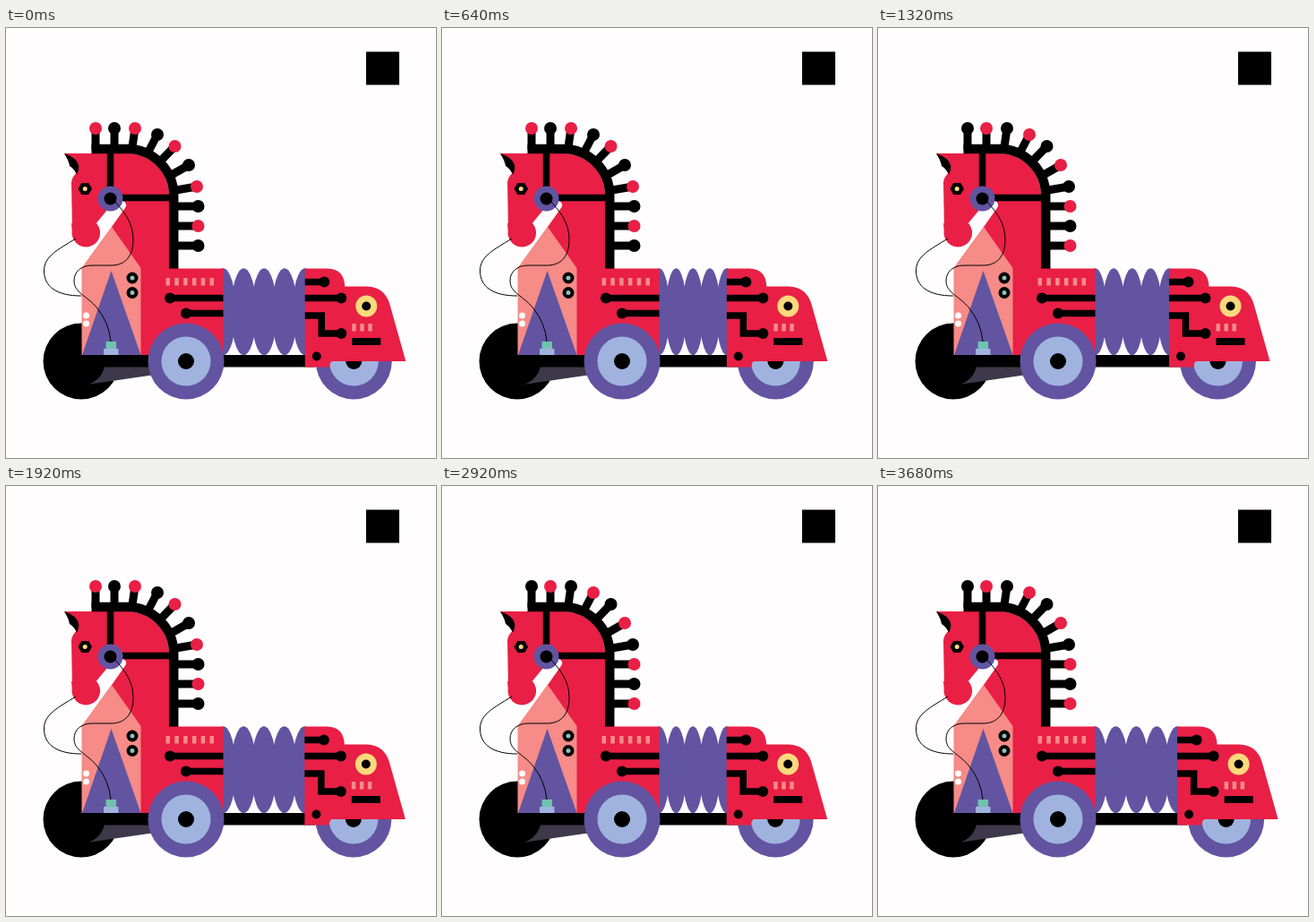
An HTML page that plays this animation: 480x480 px, repeating every 3.76 s.

```html
<!DOCTYPE html>
<html lang="en">
<head>
<meta charset="utf-8">
<title>Trojan horse car</title>
<style>
  html, body { margin: 0; width: 100%; height: 100%; overflow: hidden; background: #fffdfd; }
  svg { display: block; width: 100vw; height: 100vh; }
  .red { fill: #e91f45; }
  .purple { fill: #6254a1; }
  .blue { fill: #9fb3de; }
  .pink { fill: #f68b87; }
  .yellow { fill: #fed97c; }
  .white { fill: #fffdfd; }
  .line { fill: none; stroke: #000; stroke-width: 7.5; }
  .wire { fill: none; stroke: #000; stroke-width: 1; }
</style>
</head>
<body>
<svg viewBox="0 0 480 480">
  <defs>
    <g id="wheel">
      <circle class="purple" r="42.5"/>
      <circle class="blue" r="27.5"/>
      <circle r="9"/>
    </g>
  </defs>

  <rect x="402" y="26.5" width="37" height="37"/>

  <!-- far wheel and axle -->
  <circle cx="84" cy="372" r="42.5"/>
  <path fill="#3d394a" d="M110 376H163V387.500L84 399A27 27 0 0 0 110 378Z"/>
  <path d="M84 365H345V378.500H84Z"/>

  <g id="bellows" class="purple"></g>

  <!-- neck and head -->
  <path class="red" d="M65 140H135A47 47 0 0 1 182 187V269H84L74 227L73 172Q74 166 78.500 162Z"/>
  <path class="white" d="M60 220H99L118 197L129 192Q136 195 133.500 200L118 222L84 269H60Z"/>
  <path class="red" d="M73 218H101A15.800 15.800 0 1 1 73.700 226Z"/>
  <path d="M65 140Q79 145 81 153Q82 158 79 163.500Q76 157 71 154Q70 148 65 140Z"/>
  <path class="line" style="stroke-width:10.500" d="M95.500 135H135A52 52 0 0 1 187.200 187V269"/>
  <path class="line" d="M116.500 135V190M116.500 189.500H188"/>
  <path d="M80.500 179.500L84.300 173H92.200L96 179.500L92.200 186H84.300Z"/>
  <circle class="yellow" cx="88.200" cy="179.500" r="2.500"/>
  <g id="mane"></g>

  <!-- rear body and chest -->
  <path class="red" d="M150 268.500H242.500V365H150Z"/>
  <path class="pink" d="M84.500 365V268L118 222L150.500 268V365Z"/>
  <path class="purple" d="M117.500 271L150.500 365H85Z"/>
  <circle class="white" cx="89.500" cy="321" r="3.500"/>
  <circle class="white" cx="89.500" cy="330" r="3.500"/>
  <g fill="#8fc4bc" stroke="#000" stroke-width="4">
    <circle cx="141" cy="279" r="4.500"/>
    <circle cx="141" cy="295.500" r="4.500"/>
  </g>
  <path fill="#6fc3ae" d="M111.500 350H123V358.500H111.500Z"/>
  <path class="blue" d="M109 358H125.500V365H109Z"/>
  <g id="vents" class="pink"></g>
  <path class="line" d="M183 301.500H242.500M201 318.500H242.500"/>
  <circle cx="183" cy="301.500" r="6"/>
  <circle cx="201" cy="318.500" r="6"/>
  <use href="#wheel" x="201" y="372"/>

  <!-- headphone and cables -->
  <circle class="purple" cx="116.500" cy="190.500" r="14"/>
  <circle cx="116.500" cy="190.500" r="7"/>
  <path class="wire" d="M120 192C130 203 142 216 142 236C142 254 134 264.500 118 265H96
    C84 265 76 272 76 282C76 296 90 298 102 313Q115 329 117 350"/>
  <path class="wire" d="M78 235C57 248 42.500 255 42.500 271C42.500 289 57 299 84 299"/>

  <g id="cab">
    <use href="#wheel" x="388" y="372"/>
    <path class="red" d="M333.500 268.500H359Q377 269 378 288.500H403Q422 289 428 308L446 372H364
      Q361 373 361 378.500H333.500Z"/>
    <path class="line" d="M333.500 283.500H355M333.500 301.500H374M333.500 321H352V341H374"/>
    <circle cx="355" cy="283.500" r="6"/>
    <circle cx="374" cy="301.500" r="6"/>
    <circle cx="374" cy="341" r="6"/>
    <circle class="yellow" cx="402" cy="310.500" r="12"/>
    <circle cx="402" cy="310.500" r="5"/>
    <path class="pink" d="M386 330h4.500v8.500h-4.500zM395 330h4.500v8.500h-4.500zM404 330h4.500v8.500h-4.500z"/>
    <path d="M386 346H418V354H386Z"/>
    <circle cx="346.500" cy="366.500" r="5"/>
  </g>
</svg>
<script>
  const LOOP = 3760, STEP = 40, HALF = LOOP / 2;
  const PEAK = 1800, CLOSE = 920, REST = 0.6, TRAVEL = 18.3;
  const LEFT = 242.5, RIGHT = 333.5, FOLDS = 4;

  const $ = id => document.getElementById(id);
  function add(parent, tag, attrs) {
    const el = document.createElementNS('http://www.w3.org/2000/svg', tag);
    for (const key in attrs) el.setAttribute(key, attrs[key]);
    return parent.appendChild(el);
  }

  // bulb x, y, then stem root x, y
  const pins = [
    [100, 112, 100, 136], [121, 112, 121, 136], [144, 112, 140.5, 136], [169, 119, 159, 138],
    [188.5, 132, 173, 148], [204, 153, 183, 165], [213, 177, 187, 181.5],
    [214.5, 199, 188, 199], [214.5, 221, 188, 221], [214.5, 243, 188, 243]
  ];
  const bulbs = pins.map(([x, y, rx, ry]) => {
    add($('mane'), 'path', { d: `M${rx} ${ry}L${x} ${y}`, stroke: '#000', 'stroke-width': 9 });
    return add($('mane'), 'circle', { cx: x, cy: y, r: 7 });
  });

  for (let i = 0; i < 6; i++)
    add($('vents'), 'rect', { x: 178.5 + i * 9.8, y: 279, width: 4.5, height: 8.5 });

  const folds = Array.from({ length: FOLDS + 1 }, () =>
    add($('bellows'), 'ellipse', { cy: 316.8, ry: 48.5 }));

  const ease = p => (1 - Math.cos(Math.PI * p)) / 2;

  function squeeze(t) {
    const p = (t - PEAK + LOOP) % HALF;
    return p < CLOSE ? ease(p / CLOSE) : 1 - ease((p - CLOSE) / (HALF - CLOSE));
  }

  function draw(ms) {
    const t = Math.min(Math.floor((ms % LOOP) / STEP) * STEP, LOOP - 2 * STEP);
    const dx = REST - TRAVEL * squeeze(t);
    $('cab').setAttribute('transform', `translate(${dx.toFixed(2)} 0)`);

    const gap = (RIGHT + dx - LEFT) / FOLDS;
    folds.forEach((el, i) => {
      el.setAttribute('cx', LEFT + i * gap);
      el.setAttribute('rx', gap * 0.62);
    });

    const lit = (t >= 920 && t < 1880) || t >= 2800 ? 1 : 0;
    bulbs.forEach((el, i) => el.setAttribute('fill', i % 2 === lit ? '#e91f45' : '#000'));
  }

  const start = performance.now();
  function tick() {
    draw(performance.now() - start);
    requestAnimationFrame(tick);
  }
  tick();
</script>
</body>
</html>
```
